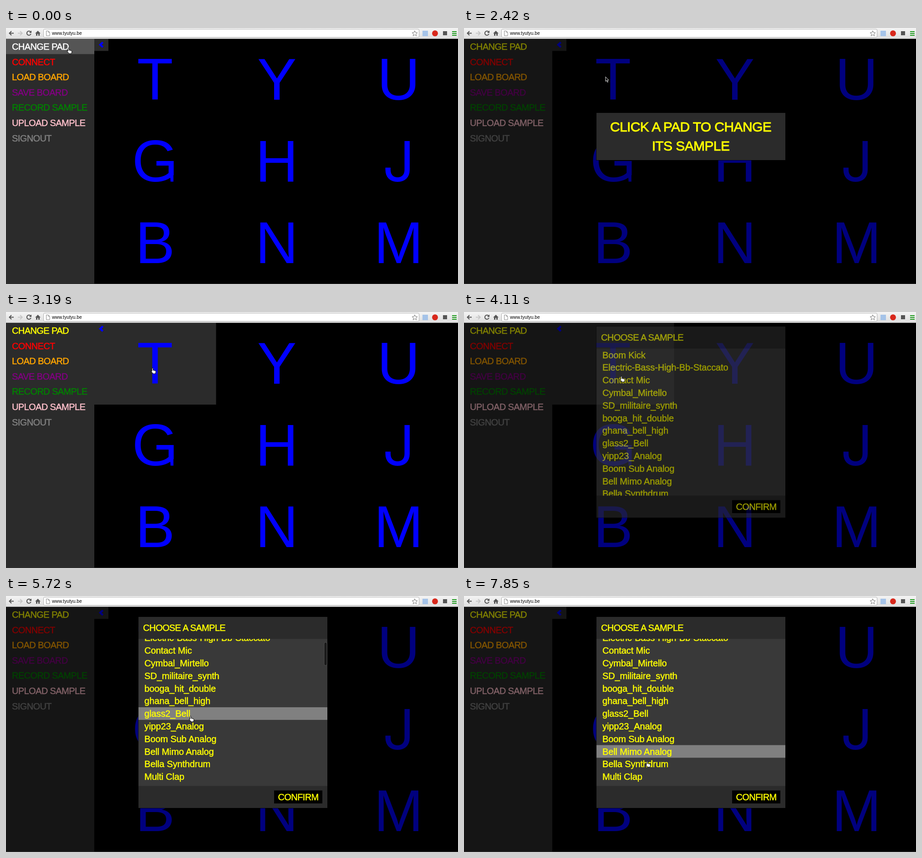
An HTML page for the animation above (7.99 s loop, 993 px wide and 564 px high).

```html
<!DOCTYPE html>
<html lang="en">
<head>
<meta charset="utf-8">
<title>Sample pads</title>
<style>
  html, body { margin: 0; width: 100%; height: 100%; overflow: hidden; background: #000; }
  svg { display: block; }
  text { font-family: "Liberation Sans", Arial, sans-serif; font-size: 20px; }
  .caps { letter-spacing: -.6px; stroke-width: .5px; }
  #menu text { stroke: currentColor; fill: currentColor; }
  #pads { fill: #00f; }
  #pads text { font-size: 130px; text-anchor: middle; }
  #pads .hook { font-family: Inter, sans-serif; font-size: 123px; }
  .modal { fill: #ff0; }
  .modal text { stroke: #ff0; stroke-width: .5px; }
  .modal .prompt { font-size: 30px; text-anchor: middle; stroke-width: .9px; }
  #list text { letter-spacing: -.12px; }
  .panel { fill: #2b2b2b; }
  .frame { fill: none; stroke: #000; stroke-opacity: .6; }
  .icon { fill: none; stroke: #555; stroke-width: 2; }
</style>
</head>
<body>
<svg width="100%" height="100%" viewBox="0 0 993 564">
  <defs>
    <linearGradient id="chrome" x2="0" y2="1">
      <stop stop-color="#f4f4f4"/><stop offset="1" stop-color="#dedede"/>
    </linearGradient>
  </defs>

  <rect width="993" height="564"/>
  <rect class="panel" y="24" width="194" height="539"/>
  <rect id="menuHover" y="24" width="194" height="33.5" fill="#555"/>
  <g id="menu"></g>
  <rect class="panel" x="194" y="24" width="31" height="26.5"/>
  <rect class="panel" id="padHover" x="193.5" y="24" width="268" height="180"/>
  <g id="pads"><path d="M360 312h7.8v26.5h-6.3z"/></g>
  <path d="M212.8 31.5L207 36.8l5.8 5.2" fill="none" stroke="#00f" stroke-width="4.4"/>
  <rect id="dim" y="24" width="993" height="540"/>
  <rect y="563" width="993" height="1" fill="#333"/>

  <g id="prompt" class="modal">
    <rect class="panel" x="291" width="415" height="104"/>
    <rect class="frame" x="290.5" y="-.5" width="416" height="105"/>
    <text class="prompt caps" x="498" y="41.3">CLICK A PAD TO CHANGE</text>
    <text class="prompt caps" x="498" y="83">ITS SAMPLE</text>
  </g>

  <g id="chooser" class="modal">
    <rect class="panel" x="291" width="415" height="421"/>
    <rect class="frame" x="290.5" y="-.5" width="416" height="422"/>
    <text class="caps" x="301" y="31">CHOOSE A SAMPLE</text>
    <rect x="291" y="48.5" width="415" height="324" fill="#393939"/>
    <svg x="291" y="48.5" width="415" height="324" overflow="hidden">
      <g id="list"><rect id="rowHover" width="415" height="27.8" fill="#808080"/></g>
      <rect id="scrollbar" x="408" width="6" height="51" rx="3" fill="#191919" stroke="#555" stroke-width=".8"/>
    </svg>
    <rect x="589" y="382.5" width="106" height="28.5" fill="#000"/>
    <text class="caps" x="597.5" y="403.5">CONFIRM</text>
  </g>

  <g id="toolbar">
    <rect width="993" height="24" fill="url(#chrome)"/>
    <path d="M0 23.5H993" stroke="#b4b4b4"/>
    <path class="icon" d="M17 11.5H8M12 7l-4.6 4.5L12 16"/>
    <path class="icon" d="M26 11.5h9M31 7l4.6 4.5L31 16" style="stroke:#c6c6c6"/>
    <path class="icon" d="M54 8.5a4.6 4.6 0 1 0 .8 4.3"/>
    <path d="M56 5.5v5.3h-5.3z" fill="#555"/>
    <path d="M64 12l6-6 6 6h-2v5h-3v-4h-2v4h-3v-5z" fill="#555"/>
    <rect x="82.5" y="2.5" width="825" height="18" rx="2.5" fill="#fff" stroke="#b0b0b0"/>
    <path d="M88.5 6.5h4.5l3 3v7.5h-7.5zM93 6.5v3h3" fill="#fff" stroke="#888"/>
    <text x="101" y="15.3" style="font-size:10.2px">www.tyutyu.be</text>
    <path d="M898 6l1.7 4 4.2.3-3.2 2.8 1 4.2-3.7-2.3-3.7 2.3 1-4.2-3.2-2.8 4.2-.3z" fill="#fff" stroke="#777"/>
    <rect x="915" y="6" width="12" height="12" fill="#a5c3e8"/>
    <circle cx="942.5" cy="11.8" r="6.5" fill="#d8281c"/>
    <rect x="960" y="7" width="9" height="9" fill="#555"/>
    <path d="M980 8h10M980 12h10M980 16h10" stroke="#1c9a1c" stroke-width="2.2"/>
  </g>

  <g id="cursor">
    <path id="hand" fill="#fff" stroke="#000" stroke-width="1" stroke-linejoin="round"
      d="M-1.2 1.2q0-1.2 1.2-1.2t1.2 1.2v3.6l4.3.9q2 .5 1.8 2.3l-1 4.5h-5l-4.4-5q-.2-1.6 1.9-.8z"/>
    <path id="arrow" fill="#000" stroke="#fff" stroke-width=".9"
      d="M0 0v10l2.3-2 1.7 4 1.6-.7-1.7-3.9h3z"/>
  </g>
</svg>

<script>
const LOOP = 7990, ROW = 27.8, LIST_TOP = 48.5;
const $ = id => document.getElementById(id);

function set(id, attrs) {
  for (const name in attrs) $(id).setAttribute(name, attrs[name]);
}

function addText(parent, content, x, y, attrs = {}) {
  const node = document.createElementNS("http://www.w3.org/2000/svg", "text");
  for (const [name, value] of Object.entries({ x, y, ...attrs })) node.setAttribute(name, value);
  node.textContent = content;
  parent.append(node);
  return node;
}

const menuItems = {
  "CHANGE PAD": "yellow", "CONNECT": "red", "LOAD BOARD": "orange", "SAVE BOARD": "purple",
  "RECORD SAMPLE": "green", "UPLOAD SAMPLE": "pink", "SIGNOUT": "gray"
};
const menuTexts = Object.entries(menuItems).map(([label, color], i) =>
  addText($("menu"), label, 13, 48 + 33.6 * i, { color, class: "caps" }));

// The J comes from a face that draws it without a top bar.
[..."TYUGHJBNM"].forEach((letter, i) =>
  addText($("pads"), letter, 327.5 + 267.5 * (i % 3), 158.3 + 179.7 * Math.floor(i / 3),
    { class: letter === "J" ? "hook" : "" }));

["Boom Kick", "Electric-Bass-High-Bb-Staccato", "Contact Mic", "Cymbal_Mirtello",
  "SD_militaire_synth", "booga_hit_double", "ghana_bell_high", "glass2_Bell", "yipp23_Analog",
  "Boom Sub Analog", "Bell Mimo Analog", "Bella Synthdrum", "Multi Clap"
].forEach((name, i) => addText($("list"), name, 13, 21 + ROW * i));

// Each step: start time in ms and what changes then; everything else carries over.
const steps = [
  [0, { x: 137.5, y: 44, hand: true, menuHover: true, padHover: false, dim: 0,
        prompt: 0, promptY: 172, chooser: 0, chooserY: 32, scroll: 0, bar: false, row: -1 }],
  [500, { dim: .45, prompt: .6 }],
  [860, { dim: .5, prompt: 1, promptY: 183 }],
  [1160, { promptY: 187 }],
  [1520, { x: 200, y: 70, hand: false, menuHover: false }],
  [1670, { x: 255, y: 92 }],
  [1820, { x: 287, y: 101 }],
  [2120, { x: 296, y: 103 }],
  [2270, { x: 305, y: 106 }],
  [2420, { x: 311, y: 107.5 }],
  [2860, { x: 314, y: 112, prompt: .4, promptY: 174 }],
  [3020, { x: 319, y: 119, prompt: 0, dim: .2 }],
  [3190, { x: 322, y: 123.5, hand: true, padHover: true, dim: 0 }],
  [3340, { x: 340, y: 141, dim: .45 }],
  [3660, { x: 346, y: 141.5 }],
  [4110, { dim: .5, chooser: .6 }],
  [4350, { chooser: 1, chooserY: 44 }],
  [4670, { chooserY: 45 }],
  [5120, { x: 365, y: 175, chooserY: 46, padHover: false }],
  [5390, { x: 390, y: 225, scroll: 28, bar: true }],
  [5720, { x: 405.5, y: 264.5, scroll: 44, row: 7 }],
  [5900, { y: 240, row: 6 }],
  [6050, { y: 214, row: 5 }],
  [6200, { y: 188, row: 4 }],
  [6650, { y: 220, row: 5, bar: false }],
  [6800, { y: 262, row: 7 }],
  [6960, { y: 300, row: 8 }],
  [7120, { y: 338, row: 10 }],
  [7410, { y: 300, row: 9 }],
  [7560, { y: 262, row: 7 }],
  [7700, { y: 305, row: 8 }],
  [7850, { x: 402.5, y: 364.5, row: 10 }]
];

const show = (id, on) => set(id, { visibility: on ? "visible" : "hidden" });

function draw(now) {
  const time = now % LOOP;
  const s = Object.assign({}, ...steps.filter(([start]) => start <= time).map(step => step[1]));

  show("menuHover", s.menuHover);
  menuTexts[0].setAttribute("color", s.menuHover ? "white" : "yellow");
  show("padHover", s.padHover);
  set("dim", { opacity: s.dim });
  set("prompt", { opacity: s.prompt, transform: `translate(0 ${s.promptY})` });
  set("chooser", { opacity: s.chooser, transform: `translate(0 ${s.chooserY})` });
  set("list", { transform: `translate(0 ${-s.scroll})` });
  show("rowHover", s.row >= 0);
  set("rowHover", { y: ROW * s.row });
  show("scrollbar", s.bar);
  set("scrollbar", { y: 51.2 - LIST_TOP + s.scroll * .11 });
  set("cursor", { transform: `translate(${s.x} ${s.y})` });
  show("hand", s.hand);
  show("arrow", !s.hand);
  requestAnimationFrame(draw);
}
requestAnimationFrame(draw);
</script>
</body>
</html>
```
